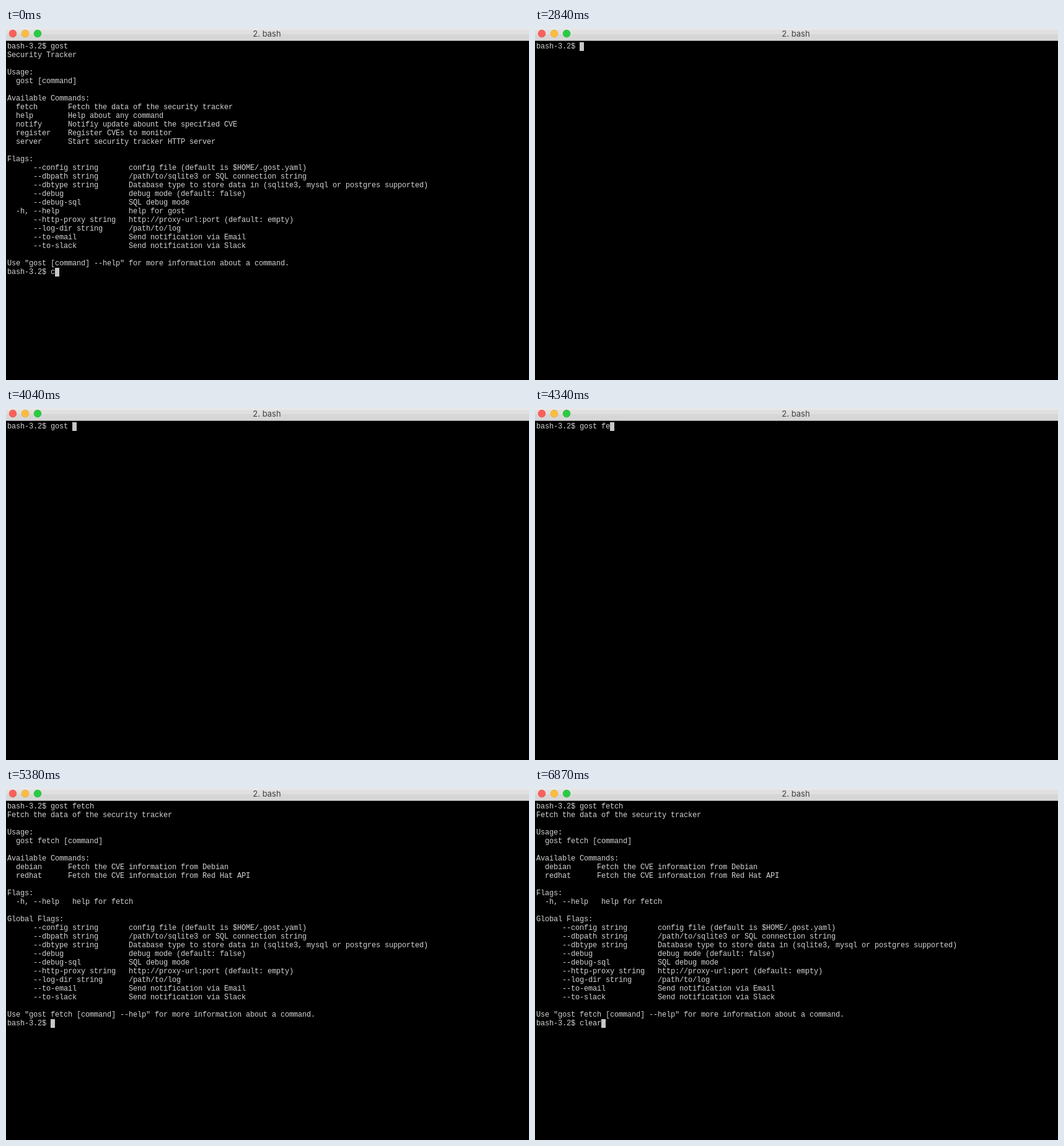
Write an HTML page that moves like this. It is 844 px wide and 568 px high and loops after 8000 ms.

```html
<!DOCTYPE html>
<html lang="en">
<head>
<meta charset="utf-8">
<title>Terminal</title>
<style>
  html, body { margin: 0; width: 100%; height: 100%; overflow: hidden; background: #000; }
  svg { display: block; }
  #screen {
    position: absolute; left: 2px; top: 23px; margin: 0;
    font: 12px/14px "Liberation Mono", monospace; color: #d2d2d2;
  }
  #title { font: 13px Inter, sans-serif; fill: #404040; text-anchor: middle; }
</style>
</head>
<body>
<svg width="844" height="568" viewBox="0 0 844 568">
  <rect width="844" height="568" fill="#000"/>
  <rect width="844" height="21" fill="#d6d6d6"/>
  <rect width="844" height="10" fill="#e0e0e0"/>
  <rect width="844" height="3" fill="#e8e8e8"/>
  <rect y="20" width="844" height="1" fill="#8e8e8e"/>
  <g stroke-width="0.6">
    <circle cx="11" cy="9" r="5.9" fill="#fc605b" stroke="#e0443e"/>
    <circle cx="31" cy="9" r="5.9" fill="#fdbc40" stroke="#dea123"/>
    <circle cx="51" cy="9" r="5.9" fill="#28cc42" stroke="#1aab29"/>
  </g>
  <text id="title" x="421" y="14">2. bash</text>
  <rect id="cursor" width="7" height="14" fill="#c7c7c7"/>
</svg>
<pre id="screen"></pre>
<script>
const LOOP = 8000, CELL = 7, ROW = 14, LEFT = 2, TOP = 23;
const PROMPT = "bash-3.2$ ";
const screen = document.getElementById("screen");
const cursor = document.getElementById("cursor");

const command = (name, about) => "  " + name.padEnd(12) + about;
const flag = (name, about, short = "") => ("  " + short).padEnd(6) + name.padEnd(22) + about;

const commonFlags = [
  flag("--config string", "config file (default is $HOME/.gost.yaml)"),
  flag("--dbpath string", "/path/to/sqlite3 or SQL connection string"),
  flag("--dbtype string", "Database type to store data in (sqlite3, mysql or postgres supported)"),
  flag("--debug", "debug mode (default: false)"),
  flag("--debug-sql", "SQL debug mode"),
  flag("--http-proxy string", "http://proxy-url:port (default: empty)"),
  flag("--log-dir string", "/path/to/log"),
  flag("--to-email", "Send notification via Email"),
  flag("--to-slack", "Send notification via Slack")
];

const mainHelp = [
  PROMPT + "gost",
  "Security Tracker",
  "",
  "Usage:",
  "  gost [command]",
  "",
  "Available Commands:",
  command("fetch", "Fetch the data of the security tracker"),
  command("help", "Help about any command"),
  command("notify", "Notifiy update abount the specified CVE"),
  command("register", "Register CVEs to monitor"),
  command("server", "Start security tracker HTTP server"),
  "",
  "Flags:",
  ...commonFlags.slice(0, 5),
  flag("--help", "help for gost", "-h, "),
  ...commonFlags.slice(5),
  "",
  'Use "gost [command] --help" for more information about a command.'
];

const fetchHelp = [
  PROMPT + "gost fetch",
  "Fetch the data of the security tracker",
  "",
  "Usage:",
  "  gost fetch [command]",
  "",
  "Available Commands:",
  command("debian", "Fetch the CVE information from Debian"),
  command("redhat", "Fetch the CVE information from Red Hat API"),
  "",
  "Flags:",
  "  -h, --help   help for fetch",
  "",
  "Global Flags:",
  ...commonFlags,
  "",
  'Use "gost fetch [command] --help" for more information about a command.'
];

// Each scene types its input: keys hold [time, characters visible].
const scenes = [
  { start: 0, output: mainHelp, input: "clear",
    keys: [[0, 1], [150, 2], [300, 3], [450, 4], [750, 5]] },
  { start: 2840, output: [], input: "gost fetch",
    keys: [[3290, 2], [3740, 3], [3890, 4], [4040, 5], [4190, 6], [4340, 7], [4490, 8], [4780, 10]] },
  { start: 5380, output: fetchHelp, input: "clear",
    keys: [[6270, 1], [6420, 3], [6720, 4], [6870, 5]] }
];

const latest = (list, test) => list.filter(test).pop();

// Keep the characters on the terminal's whole-pixel cell grid.
function snapToGrid() {
  const count = 100;
  screen.textContent = "0".repeat(count);
  const advance = screen.getBoundingClientRect().width / count;
  screen.style.letterSpacing = (CELL - advance).toFixed(4) + "px";
}

function draw(t) {
  const scene = latest(scenes, s => s.start <= t);
  const key = latest(scene.keys, k => k[0] <= t);
  const current = PROMPT + scene.input.slice(0, key ? key[1] : 0);
  const text = [...scene.output, current].join("\n");
  if (screen.textContent !== text) screen.textContent = text;
  cursor.setAttribute("x", LEFT + current.length * CELL);
  cursor.setAttribute("y", TOP + scene.output.length * ROW);
}

snapToGrid();
const begin = performance.now();
function tick() {
  draw((performance.now() - begin) % LOOP);
  requestAnimationFrame(tick);
}
tick();
</script>
</body>
</html>
```
